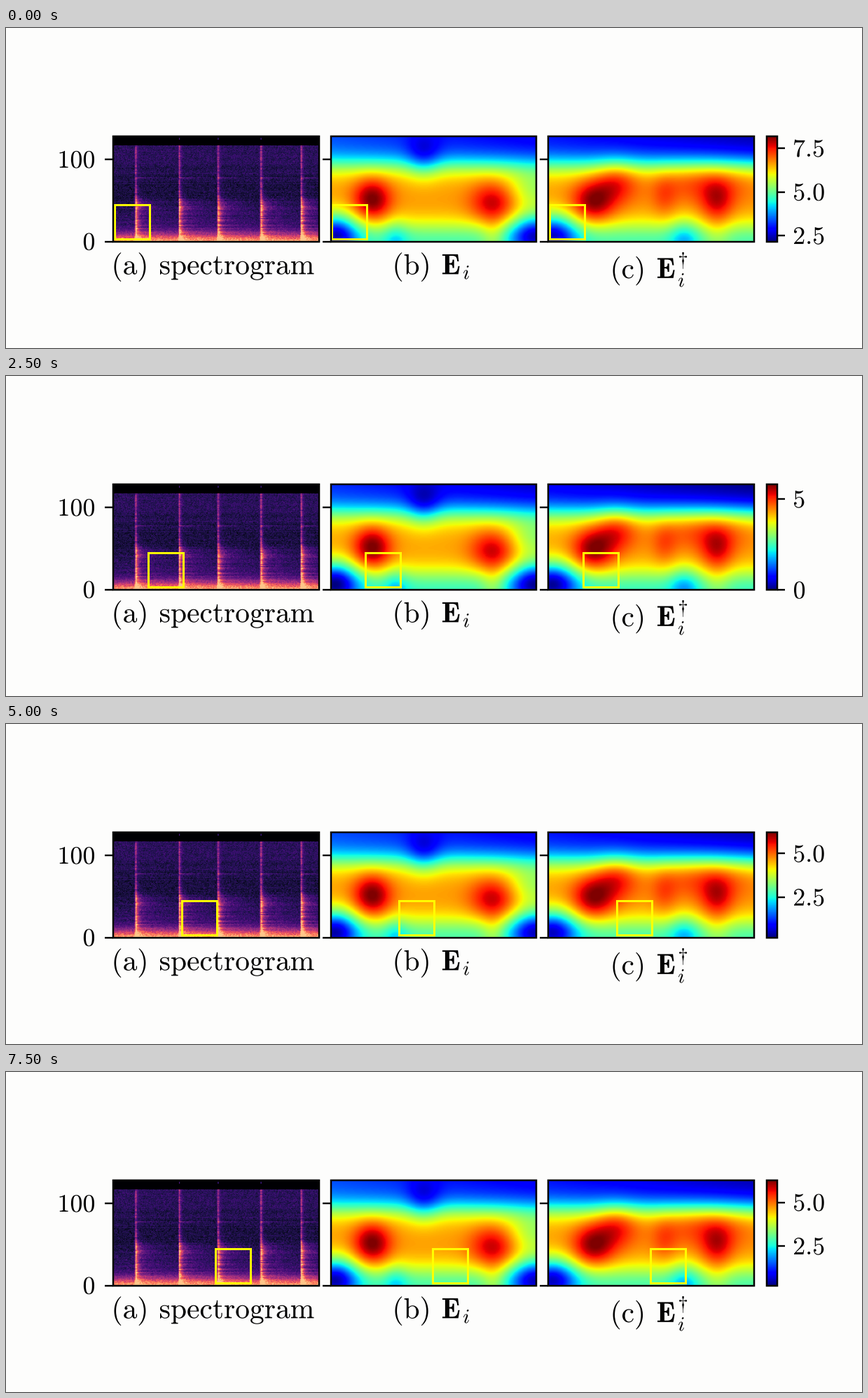
Write a matplotlib script that moves like this. It is 1222x458 px and loops after 8 s.

```python
import matplotlib.pyplot as plt
import numpy as np
from matplotlib.animation import FuncAnimation
from matplotlib.patches import PathPatch, Rectangle
from matplotlib.textpath import TextPath
from matplotlib.transforms import Affine2D

plt.rcParams["mathtext.fontset"] = "cm"

W, H, DPI = 1222, 458, 100
PX = 72 / DPI                       # points per pixel
PAPER = "#fdfdfc"
PANELS = (153, 463.6, 774.2)        # left edges
PW, TOP, BOTTOM = 293.7, 155.4, 306.2
NT, NF = 250, 128                   # time steps, frequency bins
UNIT = (BOTTOM - TOP) / NF
BAR_X, BAR_W = 1086, 15
ROWS, SPAN = 5, 6.03                # box rows per column, value range

# Highest map value at each box position, column by column.
PEAKS = (8.17, 5.6, 4.8, 5.07, 4.5,
         5.8, 4.9, 5.45, 4.8, 4.3,
         6.2, 5.6, 4.99, 4.6, 3.9,
         6.25)

# Bumps and dips on the common ridge: centre x, centre y, width, gain.
BUMPS_B = ((.20, .40, .09, .27), (.79, .37, .11, .21),
           (.02, .08, .11, -.44), (.99, .08, .12, -.42),
           (1.0, .50, .15, -.18), (.45, .80, .08, -.15),
           (.315, 0, .06, -.12), (.79, .02, .06, .10))
BUMPS_C = ((.22, .38, .10, .25), (.33, .57, .10, .16),
           (.82, .39, .08, .17), (.75, .58, .25, .12),
           (.565, .42, .06, .07), (.02, .08, .12, -.42),
           (.66, .02, .07, -.15), (.82, .05, .07, .08))


def surface(bumps, top):
    u = ((np.arange(NT) + .5) / NT)[None, :]
    v = ((np.arange(NF) + .5) / NF)[:, None]
    roof = top - .1 * u
    z = roof + (.75 - roof) / (1 + np.exp((v - .735) / .07))
    z = z - .3 * np.exp(-(v / .2) ** 2)
    for x, y, width, gain in bumps:
        z = z + gain * np.exp(-((u - x) / width) ** 2 - ((v - y) / .2) ** 2)
    return np.clip(z, 0, 1)


def spectrogram():
    rng = np.random.default_rng(4)
    f, t = np.arange(NF)[:, None], np.arange(NT)[None, :]
    s = .16 - .05 * np.exp(-((f - 58) / 24) ** 2) + 0 * t
    s = s + rng.normal(0, .012, (NF, 1)) + rng.normal(0, .035, (NF, NT))
    low = 1 / (1 + np.exp((f - 52) / 5))
    bands = low * rng.uniform(.02, .26, (NF, 1))
    bands += .12 * np.exp(-((f - 42) / 5) ** 2) + .2 * np.exp(-((f - 77) / .9) ** 2)
    for start in (27, 80, 127, 179, 228):
        d = t - start
        after = d >= 0
        fall = np.exp(-np.maximum(d, 0) / (1.3 + 1.4 * low)) * after + .4 * (d == -1)
        grain = rng.uniform(.45, 1.15, (NF, 1))
        s = s + fall * grain * (.40 + .34 * low)
        s = s + bands * np.exp(-np.maximum(d, 0) / 18) * after * rng.uniform(.7, 1.3, (NF, NT))
    floor = .52 * np.exp(-(f / 9.5) ** 2) + .16 * np.exp(-f / 12)
    s = s + floor * rng.uniform(.75, 1.1, (NF, NT))
    s[117:] = 0
    s[124:126, [80, 127, 179]] = .3
    return np.clip(s, 0, .88)


fig = plt.figure(figsize=(W / 100, H / 100), dpi=DPI, facecolor=PAPER)
ax = fig.add_axes([0, 0, 1, 1])
ax.axis("off")


def image(data, x, w=PW, **style):
    return ax.imshow(data, extent=(x, x + w, BOTTOM, TOP), origin="lower",
                     aspect="auto", **style)


def label(text, x, y, size, align="left"):
    """Text whose ink starts (or ends) at x, on baseline y."""
    path = TextPath((0, 0), f"${text}$", size=size)
    box = path.get_extents()
    edge = box.x0 if align == "left" else box.x1
    place = Affine2D().translate(-edge, 0).scale(1, -1).translate(x, y)
    return ax.add_patch(PathPatch(place.transform_path(path), fc="black",
                                  lw=0, zorder=4))


def tick(x, y, length=12):
    return ax.plot([x, x + length], [y, y], color="black", lw=2.4 * PX,
                   solid_capstyle="butt", zorder=3)[0]


def outline(x, y, w, h, color, width, z):
    return ax.add_patch(Rectangle((x, y), w, h, fill=False, ec=color,
                                  lw=width * PX, zorder=z))


image(spectrogram(), PANELS[0], cmap="magma", vmin=0, vmax=1)
maps = [image(surface(BUMPS_B, .19), PANELS[1], cmap="jet"),
        image(surface(BUMPS_C, .13), PANELS[2], cmap="jet")]
image(np.linspace(0, 1, 256)[:, None], BAR_X, BAR_W, cmap="jet")

for left in PANELS:
    outline(left, TOP, PW, BOTTOM - TOP, "black", 2.5, 3)
    for bin_ in (0, 100):
        tick(left - 12, BOTTOM - (bin_ + .5) * UNIT)
outline(BAR_X, TOP, BAR_W, BOTTOM - TOP, "black", 2.5, 3)

label(r"\mathrm{100}", 126, 200, 36, "right")
label(r"\mathrm{0}", 126, 317.5, 36, "right")
label(r"\mathrm{(a)}", 154.5, 352.5, 41.5)
label(r"\mathrm{spectrogram}", 220, 352.5, 41.5)
label(r"\mathrm{(b)}", 555.5, 352.5, 41.5)
label(r"\mathbf{E}", 623, 352.5, 41.5)
label("i", 653, 359.5, 29)
label(r"\mathrm{(c)}", 866.5, 358, 41.5)
label(r"\mathbf{E}", 930, 358, 41.5)
label("i", 960, 370.5, 29)
label(r"\dagger", 961, 340.5, 29)

boxes = [outline(0, 0, 50, 49, "#ffff00", 3, 2) for _ in PANELS]
marks = []

ax.set_xlim(0, W)
ax.set_ylim(H, 0)


def bar_ticks(lo, hi):
    """Coarsest round step that still gives two ticks."""
    for step in (5, 2.5, 2):
        values = np.arange(np.ceil(lo / step), np.floor(hi / step) + 1) * step
        if len(values) > 1:
            break
    return values, 1 if step == 2.5 else 0


def update(i):
    col, row = divmod(i, ROWS)
    for box, left in zip(boxes, PANELS):
        box.set_xy((left + 1.8 + 48 * col, 253.2 - 24 * row))

    hi = PEAKS[i]
    lo = max(0, hi - SPAN)
    for m in maps:
        m.set_clim(1 - (hi - lo) / SPAN, 1)

    while marks:
        marks.pop().remove()
    values, digits = bar_ticks(lo, hi)
    for v in values:
        y = BOTTOM - (v - lo) / (hi - lo) * (BOTTOM - TOP)
        marks.append(tick(BAR_X + BAR_W, y, 11))
        marks.append(label(rf"\mathrm{{{v:.{digits}f}}}", 1125, y + 12, 36))
    return [*boxes, *maps, *marks]


anim = FuncAnimation(fig, update, frames=len(PEAKS), interval=500,
                     repeat=True, repeat_delay=0, blit=False)
plt.show()
```
